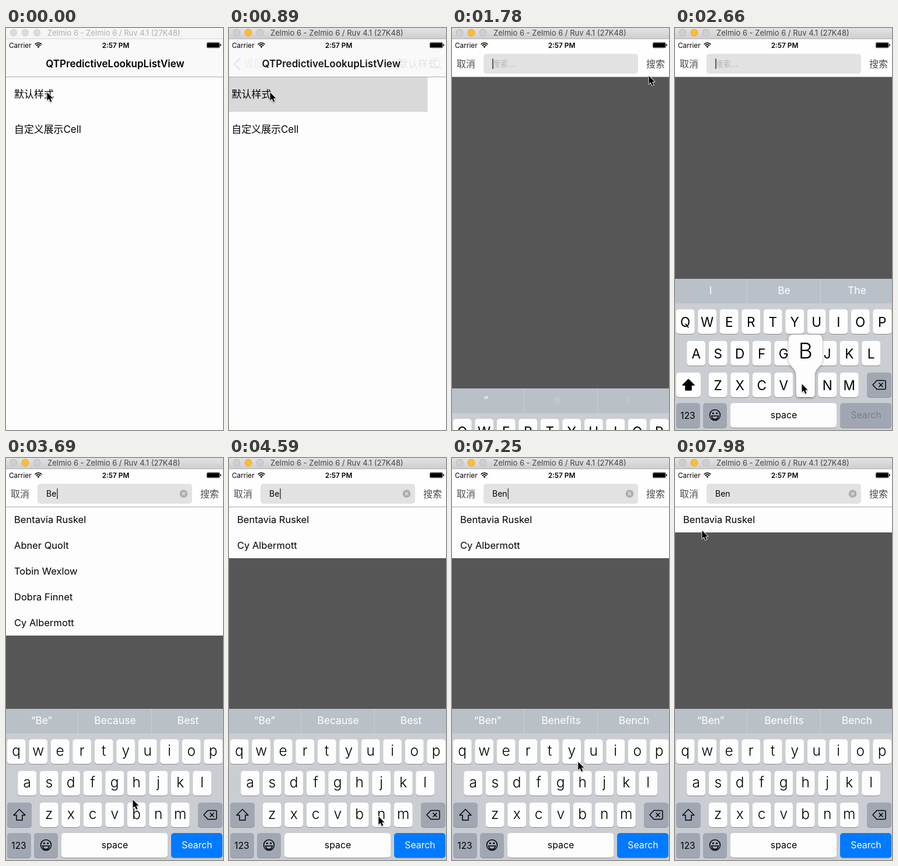
An HTML page with a canvas that plays this animation: 372 px wide and 686 px high, repeating every 8000 ms.

```html
<!DOCTYPE html>
<html lang="zh-CN">
<head>
<meta charset="utf-8">
<title>Search demo</title>
<style>
html, body { margin: 0; width: 100%; height: 100%; overflow: hidden; background: #fdfdfd; }
canvas { display: block; }
</style>
</head>
<body>
<canvas id="stage" width="372" height="686"></canvas>
<script>
const ctx = document.getElementById('stage').getContext('2d');
const W = 372, H = 686, LOOP = 8000, STEP = 147.4;
const FONT = 'Inter, "Noto Sans CJK SC", "Noto Sans CJK", sans-serif';
const PEOPLE = ['Bentavia Ruskel', 'Abner Quolt', 'Tobin Wexlow', 'Dobra Finnet', 'Cy Albermott'];

// Each entry: [time, x, y]
const POINTER = [
  [0, 70, 110], [1045, 70, 110], [1340, 225, 84], [1635, 340, 62], [1782, 337, 82], [1930, 320, 160],
  [2372, 235, 520], [2667, 217, 608], [2815, 217, 609], [2962, 165, 565], [3110, 95, 502],
  [3405, 93, 500], [3552, 150, 542], [3700, 218, 584], [4140, 236, 598], [4585, 256, 612],
  [4900, 256, 612], [5470, 300, 650], [6060, 327, 682], [6212, 326, 684], [6355, 310, 670],
  [6650, 256, 612], [6945, 256, 610], [7092, 242, 575], [7240, 215, 517], [7387, 160, 400],
  [7535, 105, 270], [7683, 65, 175], [7830, 49, 132], [7970, 46, 124]
];
const KEYBOARD_DROP = [[0, 258], [1635, 258], [1782, 187], [1930, 20], [2077, 0]];
const PRESSES = [['B', 2600, 2750], ['e', 3200, 3350], ['n', 6600, 6870]];
const CARET_OFF = [[2200, 2500], [4280, 4580], [5020, 5460], [6040, 6490], [7520, 8000]];

const within = (t, [from, to]) => t >= from && t < to;
const clamp = v => Math.max(0, Math.min(1, v));
const latest = (t, entries) => entries.filter(e => t >= e[0]).pop()[1];

function sample(track, t) {
  const i = track.findIndex(p => p[0] > t);
  if (i < 0) return track[track.length - 1].slice(1);
  const a = track[i - 1], b = track[i], k = (t - a[0]) / (b[0] - a[0]);
  return a.slice(1).map((v, j) => v + (b[j + 1] - v) * k);
}

function rect(x, y, w, h, color) {
  ctx.fillStyle = color;
  ctx.fillRect(x, y, w, h);
}

function round(x, y, w, h, r, color) {
  ctx.fillStyle = color;
  ctx.beginPath();
  ctx.roundRect(x, y, w, h, r);
  ctx.fill();
}

function disc(x, y, r, color) {
  ctx.fillStyle = color;
  ctx.beginPath();
  ctx.arc(x, y, r, 0, 7);
  ctx.fill();
}

function text(str, x, y, size, color = '#000', align = 'left', weight = 400) {
  ctx.font = `${weight} ${size}px ${FONT}`;
  ctx.textAlign = align;
  ctx.fillStyle = color;
  ctx.fillText(str, x, y);
}

function stroke(path, color, width) {
  ctx.strokeStyle = color;
  ctx.lineWidth = width;
  ctx.stroke(new Path2D(path));
}

function shifted(dx, dy, alpha, draw) {
  ctx.save();
  ctx.translate(dx, dy);
  ctx.globalAlpha = alpha;
  draw();
  ctx.restore();
}

function titleBar(active) {
  const shade = ctx.createLinearGradient(0, 0, 0, 18);
  shade.addColorStop(0, active ? '#e3e1e3' : '#f6f6f6');
  shade.addColorStop(1, active ? '#cfcdcf' : '#f3f3f3');
  rect(0, 0, W, 18, shade);
  rect(0, 18, W, 1, active ? '#b3b1b3' : '#d8d8d8');
  [13, 33, 53].forEach((x, i) => {
    const yellow = active && i === 1;
    disc(x, 8, 6.2, yellow ? '#e0a32a' : active ? '#b8b6b8' : '#d2d2d2');
    disc(x, 8, 5.4, yellow ? '#fdbe2c' : active ? '#d0ced0' : '#dcdcdc');
  });
  text('Zelmio 6 - Zelmio 6 / Ruv 4.1 (27K48)', 71, 13, 13, active ? '#454545' : '#b0b0b0');
}

function statusBar() {
  text('Carrier', 5, 33.5, 11.8);
  text('2:57 PM', 188, 33.5, 11.8, '#000', 'center', 600);
  ctx.lineCap = 'butt';
  stroke('M49.5 28 Q55.5 22.5 61.5 28 M51.7 30.2 Q55.5 26.7 59.3 30.2', '#000', 1.6);
  ctx.fillStyle = '#000';
  ctx.fill(new Path2D('M53.4 31.8 Q55.5 29.8 57.6 31.8 L55.5 34Z'));
  ctx.strokeStyle = '#000';
  ctx.lineWidth = 0.7;
  ctx.beginPath();
  ctx.roundRect(344.3, 24.8, 22, 9, 2);
  ctx.stroke();
  round(345, 25.5, 20.6, 7.6, 1.2, '#000');
  round(367.2, 27.5, 1.5, 3.6, 0.8, '#000');
}

function pushTransition(t) {
  const p = 1 - (1 - clamp((t - 880) / 600)) ** 3;
  rect(0, 19, W, 65, '#f9f9f9');
  shifted(-0.3 * W * p, 0, 1, () => {
    if (t >= 740) rect(0, 84, W, 59, '#d9d9d9');
    text('默认样式', 14, 119, 17);
    text('自定义展示Cell', 14, 179, 16.9);
  });
  if (p > 0) {
    rect(W * (1 - p), 84, W, H, '#fdfdfd');
    if (p === 1) {
      rect(0, 50, W, 33, '#fefefe');
      rect(364, 84, 8, H, '#f9f9f9');
    }
  }
  rect(0, 83, W, 1, '#adadad');
  shifted(-140 * p, 0, 1 - p, () =>
    text('QTPredictiveLookupListView', 187, 67, 17, '#000', 'center', 600));
  shifted(150 * (1 - p), 0, p, () => text('默认样式', 186.5, 67, 17, '#000', 'center', 500));
  shifted(0, 0, p, () => {
    stroke('M19 52 L9.5 61.5 L19 71', '#555', 3.4);
    text('返回', 26, 67, 17, '#606060');
    stroke('M361.5 59.5 A8.5 8.5 0 1 1 344.5 59.5 A8.5 8.5 0 1 1 361.5 59.5 M359 65.5 L365 71', '#222', 1.1);
  });
}

function searchBar(query, caret) {
  rect(0, 19, W, 64, '#fefefe');
  rect(0, 83, W, 1, '#a8a8a8');
  text('取消', 8, 67, 16, '#4c4c4c');
  text('搜索', 333, 67, 16, '#4c4c4c');
  round(54, 44, 265, 34, 5, '#e2e2e2');
  if (query) {
    text(query, 69, 66, 14);
    disc(304.5, 61, 6.8, '#adadad');
    stroke('M302 58.5 L307 63.5 M307 58.5 L302 63.5', '#e8e8e8', 1.2);
  } else {
    text('搜索...', 69, 66, 13.5, '#b4b4b4');
  }
  ctx.font = `400 14px ${FONT}`;
  if (caret) rect(69 + ctx.measureText(query).width + (query ? 0.8 : 0), 52, 1.7, 18, '#505050');
}

function keyCap(x, y, w, color) {
  round(x, y + 1, w, 42, 5, '#8b8e93');
  round(x, y, w, 42, 5, color);
}

function popup(letter, x, y) {
  ctx.save();
  ctx.shadowColor = 'rgba(0,0,0,.35)';
  ctx.shadowBlur = 4;
  ctx.shadowOffsetY = 1;
  ctx.fillStyle = '#fdfdfd';
  ctx.translate(x, y);
  ctx.fill(new Path2D('M-20 -65 H20 Q29 -65 29 -56 V-23 C29 -8 16 -10 16 6 V37 Q16 42 11 42' +
    ' H-11 Q-16 42 -16 37 V6 C-16 -10 -29 -8 -29 -23 V-56 Q-29 -65 -20 -65Z'));
  ctx.restore();
  text(letter, x, y - 24, 37, '#000', 'center', 300);
}

function keyboard(query, pressed, drop) {
  const gray = '#a1a7b2', white = '#fdfdfd', upper = !query;
  rect(0, 428, W, 258, '#cacdd2');
  rect(0, 428, W, 42, '#b9c0c8');
  [123, 249].forEach(x => rect(x, 428, 1, 42, '#c9ced4'));
  const rising = drop > 100;
  const words = rising ? ['“', 'B', 'T'] : {
    '': ['I', 'Be', 'The'], B: ['“B”', 'Be', 'By'],
    Be: ['“Be”', 'Because', 'Best'], Ben: ['“Ben”', 'Benefits', 'Bench']
  }[query];
  words.forEach((word, i) => {
    const faint = rising && i;
    text(word, [rising ? 58 : 61, rising ? 181 : 187, rising ? 301 : 312][i], faint ? 453 : 454,
      faint ? 13.5 : 17.5, faint ? '#cbd0d6' : '#fff', 'center');
  });

  let held;
  [['qwertyuiop', 17.7, 480], ['asdfghjkl', 36.2, 534], ['zxcvbnm', 73.7, 588]].forEach(([row, x0, y]) =>
    [...row].forEach((char, i) => {
      const x = x0 + i * 37.5, label = upper ? char.toUpperCase() : char;
      keyCap(x - 16, y, 32, white);
      text(label, x, y + (upper ? 29.5 : 27.5), upper ? 22.5 : 24.5, '#000', 'center', upper ? 400 : 350);
      if (label === pressed) held = [label, x, y];
    }));

  keyCap(2, 588, 42, upper ? white : gray);
  const arrow = 'M23 599.5 L33 609.5 H28 V618 H18 V609.5 H13 Z';
  ctx.lineJoin = 'round';
  if (upper) {
    ctx.fillStyle = '#000';
    ctx.fill(new Path2D(arrow));
  }
  stroke(arrow, '#000', 1.5);
  keyCap(329, 588, 42, gray);
  stroke('M339 609 L346 601.5 H359 Q361 601.5 361 603.5 V614.5 Q361 616.5 359 616.5 H346 Z' +
    ' M349.5 605.5 L356.5 612.5 M356.5 605.5 L349.5 612.5', '#000', 1.5);
  ctx.lineJoin = 'miter';

  keyCap(2, 640, 41, gray);
  text('123', 22, 667, 15.5, '#000', 'center');
  keyCap(48, 640, 41, gray);
  stroke('M77.5 660.5 A9 9 0 1 1 59.5 660.5 A9 9 0 1 1 77.5 660.5 M62.5 662 H74.5 Q73 667.5 68.5 667.5 Q64 667.5 62.5 662Z', '#000', 1.5);
  disc(65.3, 657.5, 1.5, '#000');
  disc(71.7, 657.5, 1.5, '#000');
  keyCap(95, 640, 182, white);
  text('space', 186.5, 666, 15.8, '#000', 'center');
  keyCap(283, 640, 88, query ? '#007aff' : gray);
  text('Search', 327.5, 666, 15.8, query ? '#fff' : '#7a7f88', 'center');
  if (held) popup(...held);
}

function pointer(x, y) {
  ctx.save();
  ctx.translate(x - 0.5, y - 0.8);
  ctx.lineJoin = 'round';
  const arrow = new Path2D('M1 0.5 V14.5 L4.2 11.6 L6.5 17 L9 16 L6.7 10.7 H11 Z');
  ctx.shadowColor = 'rgba(0,0,0,.3)';
  ctx.shadowBlur = 2;
  ctx.shadowOffsetY = 1;
  ctx.strokeStyle = '#fff';
  ctx.lineWidth = 1.8;
  ctx.stroke(arrow);
  ctx.shadowColor = 'transparent';
  ctx.fillStyle = '#000';
  ctx.fill(arrow);
  ctx.restore();
}

function render(t) {
  rect(0, 0, W, H, '#fdfdfd');
  if (t < 1750) {
    pushTransition(t);
  } else {
    const query = latest(t, [[0, ''], [2750, 'B'], [3350, 'Be'], [6870, 'Ben']]);
    const filter = latest(t, [[0, null], [3050, 'b'], [3800, 'be'], [7340, 'ben']]);
    const press = PRESSES.find(([, ...span]) => within(t, span));
    const rows = filter ? PEOPLE.filter(name => name.toLowerCase().includes(filter)) : [];
    const [drop] = sample(KEYBOARD_DROP, t);
    rect(0, 83, W, H, '#565656');
    rect(0, 83, W, rows.length * 44, '#fdfdfd');
    rows.forEach((name, i) => text(name, 14, 111 + i * 44, 16.5));
    searchBar(query, !CARET_OFF.some(span => within(t, span)));
    shifted(0, drop, 1, () => keyboard(query, press && press[0], drop));
  }
  titleBar(t >= 740);
  statusBar();
  pointer(...sample(POINTER, t));
}

function tick(now) {
  const t = now % LOOP;
  render(t < 750 ? 0 : 750 + Math.floor((t - 741) / STEP) * STEP);
  requestAnimationFrame(tick);
}
requestAnimationFrame(tick);
</script>
</body>
</html>
```
